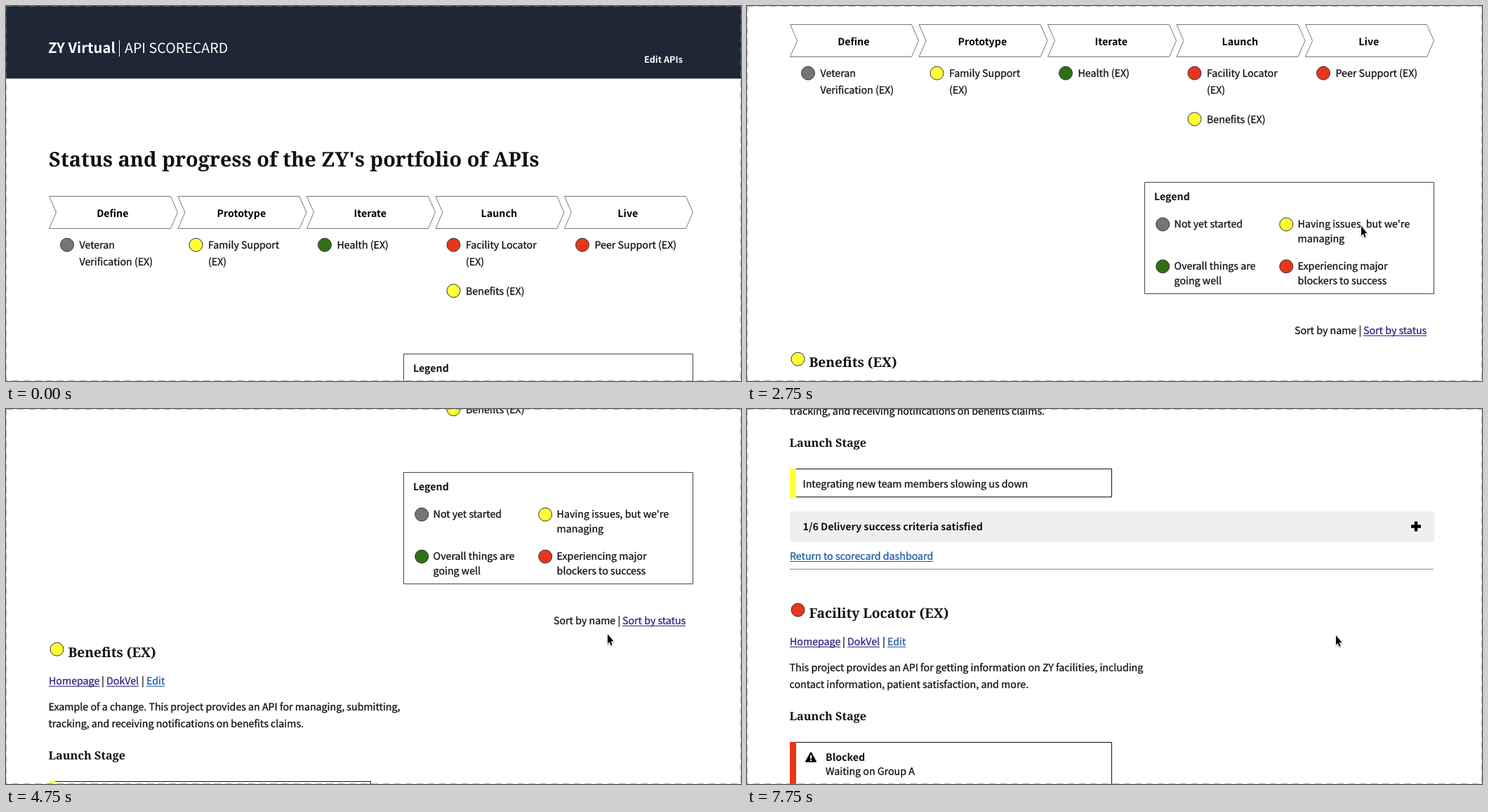
Write an HTML page with a canvas that moves like this. It is 1047 px wide and 535 px high and loops after 8000 ms.

```html
<!DOCTYPE html>
<html lang="en">
<head>
<meta charset="utf-8">
<title>API scorecard</title>
<style>
  html, body { margin: 0; width: 100%; height: 100%; overflow: hidden; background: #fff; }
  canvas { display: block; }
</style>
</head>
<body>
<canvas id="stage" width="1047" height="535"></canvas>
<script>
const W = 1047, H = 535, LOOP = 8000, STEP = 250;
const ctx = document.getElementById('stage').getContext('2d');

const SANS = '"Noto Sans CJK JP", "Noto Sans CJK SC", "Noto Sans CJK", "Open Sans", sans-serif';
const SERIF = '"Noto Serif", serif';
const BODY = `14.22px ${SANS}`;
const BOLD = `bold 14.22px ${SANS}`;
const H1 = `bold 28.9px ${SERIF}`;
const H2 = `bold 19.15px ${SERIF}`;
const H3 = `bold 16.2px ${SERIF}`;

const GREY = '#757575', YELLOW = '#ffff38', GREEN = '#2f7016', RED = '#e7361c';
const INK = '#111', VISITED = '#36207f', LINK = '#1a5aa6', NAVY = '#1d2735';

// [time, scroll offset]
const SCROLL = [
  [1250, 0], [1500, 8], [1750, 30], [2000, 70], [2250, 135], [2500, 200],
  [2750, 245], [3250, 298], [3500, 312], [3750, 320], [4000, 320], [4250, 330],
  [4500, 362], [5000, 450], [5500, 514], [5750, 531], [6250, 551],
  [6500, 570], [6750, 613], [7000, 672], [7500, 800], [7750, 852]
];
// [time, x, y] of the pointer tip
const POINTER = [
  [1500, 888, 285], [2000, 883, 295], [2750, 875, 314], [3750, 873, 315.5],
  [4250, 871, 316], [5000, 850, 324], [5750, 843, 325], [7000, 841, 324], [7750, 839, 323]
];

function track(keys, t, k = 1) {
  let i = 0;
  while (i < keys.length - 1 && keys[i + 1][0] <= t) i++;
  const a = keys[i], b = keys[i + 1];
  if (!b || t <= a[0]) return a[k];
  return a[k] + (b[k] - a[k]) * (t - a[0]) / (b[0] - a[0]);
}

function rect(x, y, w, h, color) {
  ctx.fillStyle = color;
  ctx.fillRect(x, y, w, h);
}

function text(str, x, y, font = BODY, color = INK, align = 'left') {
  ctx.font = font;
  ctx.fillStyle = color;
  ctx.textAlign = align;
  ctx.fillText(str, x, y);
  if (font !== BODY) return;
  // a hairline gives the regular weight its darker look
  ctx.strokeStyle = color;
  ctx.lineWidth = .3;
  ctx.strokeText(str, x, y);
}

function lines(list, x, y, gap) {
  list.forEach((str, i) => text(str, x, y + i * gap));
}

function link(str, x, y, color) {
  text(str, x, y, BODY, color);
  rect(x, y + 2, ctx.measureText(str).width, 1, color);
}

function dot(x, y, color) {
  ctx.beginPath();
  ctx.arc(x, y, 9.5, 0, Math.PI * 2);
  ctx.fillStyle = color;
  ctx.fill();
  ctx.strokeStyle = '#333';
  ctx.lineWidth = 1;
  ctx.stroke();
}

function poly(points, close = true) {
  ctx.beginPath();
  points.forEach(([x, y]) => ctx.lineTo(x, y));
  if (close) ctx.closePath();
}

function header() {
  rect(0, 0, W, 103.5, NAVY);
  text('ZY Virtual', 60, 66.5, `bold 20.3px ${SANS}`, '#fff');
  rect(161, 49, 1, 23, '#fff');
  text('API SCORECARD', 169, 66.5, `300 19.65px ${SANS}`, '#fff');
  text('Edit APIs', 909, 80.5, `bold 12.7px ${SANS}`, '#fff');
}

function stage(i, name, items) {
  const x = 61.5 + 183.5 * i, top = 271.5, bottom = 317.5, mid = 294.5;
  poly([[x, top], [x + 173, top], [x + 183, mid], [x + 173, bottom], [x, bottom], [x + 10, mid]]);
  ctx.strokeStyle = '#777';
  ctx.lineWidth = 1;
  ctx.stroke();
  text(name, x + 90.3, 301, BOLD, '#000', 'center');
  items.forEach(([color, ...words], n) => {
    dot(x + 25.5, 340.8 + 65.5 * n, color);
    lines(words, x + 43, 346 + 65.5 * n, 23.5);
  });
}

function legend() {
  ctx.strokeStyle = '#444';
  ctx.lineWidth = 1;
  ctx.strokeRect(566.5, 496.5, 412, 159);
  text('Legend', 580, 522, BOLD);
  const entry = (x, y, color, ...words) => {
    dot(x, y, color);
    lines(words, x + 16.4, y + 4.5, 20.5);
  };
  entry(592.2, 556.5, GREY, 'Not yet started');
  entry(768.2, 556.5, YELLOW, 'Having issues, but we\'re', 'managing');
  entry(592.2, 616.5, GREEN, 'Overall things are', 'going well');
  entry(768.2, 616.5, RED, 'Experiencing major', 'blockers to success');
  text('Sort by name |', 780, 713);
  link('Sort by status', 878, 713, VISITED);
}

function note(y, h, color) {
  rect(61, y, 9, h, color);
  poly([[70, y + .5], [519.5, y + .5], [519.5, y + h - .5], [70, y + h - .5]], false);
  ctx.strokeStyle = '#111';
  ctx.lineWidth = 1;
  ctx.stroke();
}

function project(y, color, name, about) {
  dot(72.5, y + 748.7, color);
  text(name, 88.5, y + 760, H2);
  link('Homepage', 61, y + 799, VISITED);
  text('|', 136, y + 799);
  link('DokVel', 143, y + 799, VISITED);
  text('|', 193, y + 799);
  link('Edit', 200, y + 799, LINK);
  lines(about, 60.5, y + 836, 23.5);
  text('Launch Stage', 60.5, y + 906, H3);
}

function criteria() {
  rect(61, 998, 918, 43.5, '#efefef');
  text('1/6 Delivery success criteria satisfied', 79.5, 1025, BOLD);
  ctx.strokeStyle = '#000';
  ctx.lineWidth = 4.4;
  ctx.beginPath();
  ctx.moveTo(946, 1019.5);
  ctx.lineTo(960, 1019.5);
  ctx.moveTo(953, 1012.5);
  ctx.lineTo(953, 1026.5);
  ctx.stroke();
  link('Return to scorecard dashboard', 61, 1067, LINK);
  rect(61, 1080, 917, 1, '#888');
}

function warning(x, y) {
  poly([[x, y - 6.5], [x + 7, y + 6], [x - 7, y + 6]]);
  ctx.fillStyle = ctx.strokeStyle = '#000';
  ctx.lineWidth = 2;
  ctx.fill();
  ctx.stroke();
  rect(x - 1, y - 3, 2, 5, '#fff');
  rect(x - 1, y + 3, 2, 2, '#fff');
}

function page() {
  header();
  text('Status and progress of the ZY\'s portfolio of APIs', 61, 229, H1);
  stage(0, 'Define', [[GREY, 'Veteran', 'Verification (EX)']]);
  stage(1, 'Prototype', [[YELLOW, 'Family Support', '(EX)']]);
  stage(2, 'Iterate', [[GREEN, 'Health (EX)']]);
  stage(3, 'Launch', [[RED, 'Facility Locator', '(EX)'], [YELLOW, 'Benefits (EX)']]);
  stage(4, 'Live', [[RED, 'Peer Support (EX)']]);
  legend();

  project(0, YELLOW, 'Benefits (EX)', [
    'Example of a change. This project provides an API for managing, submitting,',
    'tracking, and receiving notifications on benefits claims.'
  ]);
  note(937, 41, YELLOW);
  text('Integrating new team members slowing us down', 79.5, 964);
  criteria();

  project(390, RED, 'Facility Locator (EX)', [
    'This project provides an API for getting information on ZY facilities, including',
    'contact information, patient satisfaction, and more.'
  ]);
  note(1327, 62, RED);
  warning(91, 1349);
  text('Blocked', 112, 1353.5, BOLD);
  text('Waiting on Group A', 112, 1374);
}

function pointer(x, y) {
  ctx.save();
  ctx.translate(x, y);
  ctx.scale(.85, .95);
  poly([[0, 0], [0, 14.5], [3.2, 11.6], [5.4, 16.8], [7.8, 15.8], [5.6, 10.7], [10, 10.4]]);
  ctx.shadowColor = 'rgba(0,0,0,.35)';
  ctx.shadowBlur = 2;
  ctx.shadowOffsetY = 1;
  ctx.strokeStyle = '#fff';
  ctx.lineWidth = 2;
  ctx.stroke();
  ctx.shadowColor = 'transparent';
  ctx.fillStyle = '#000';
  ctx.fill();
  ctx.restore();
}

function frame() {
  ctx.setLineDash([10, 6]);
  ctx.strokeStyle = 'rgba(128,128,128,.6)';
  ctx.lineWidth = 1;
  ctx.strokeRect(.5, .5, W - 1, H - 1);
  ctx.setLineDash([]);
}

function draw(now) {
  const t = Math.floor((now % LOOP) / STEP) * STEP;
  rect(0, 0, W, H, '#fff');
  ctx.save();
  ctx.translate(0, -Math.round(track(SCROLL, t)));
  page();
  ctx.restore();
  frame();
  if (t >= 1500) pointer(track(POINTER, t, 1), track(POINTER, t, 2));
}

ctx.textRendering = 'geometricPrecision';
ctx.lineJoin = 'round';
const start = performance.now();
function tick() {
  draw(performance.now() - start);
  requestAnimationFrame(tick);
}
tick();
</script>
</body>
</html>
```
